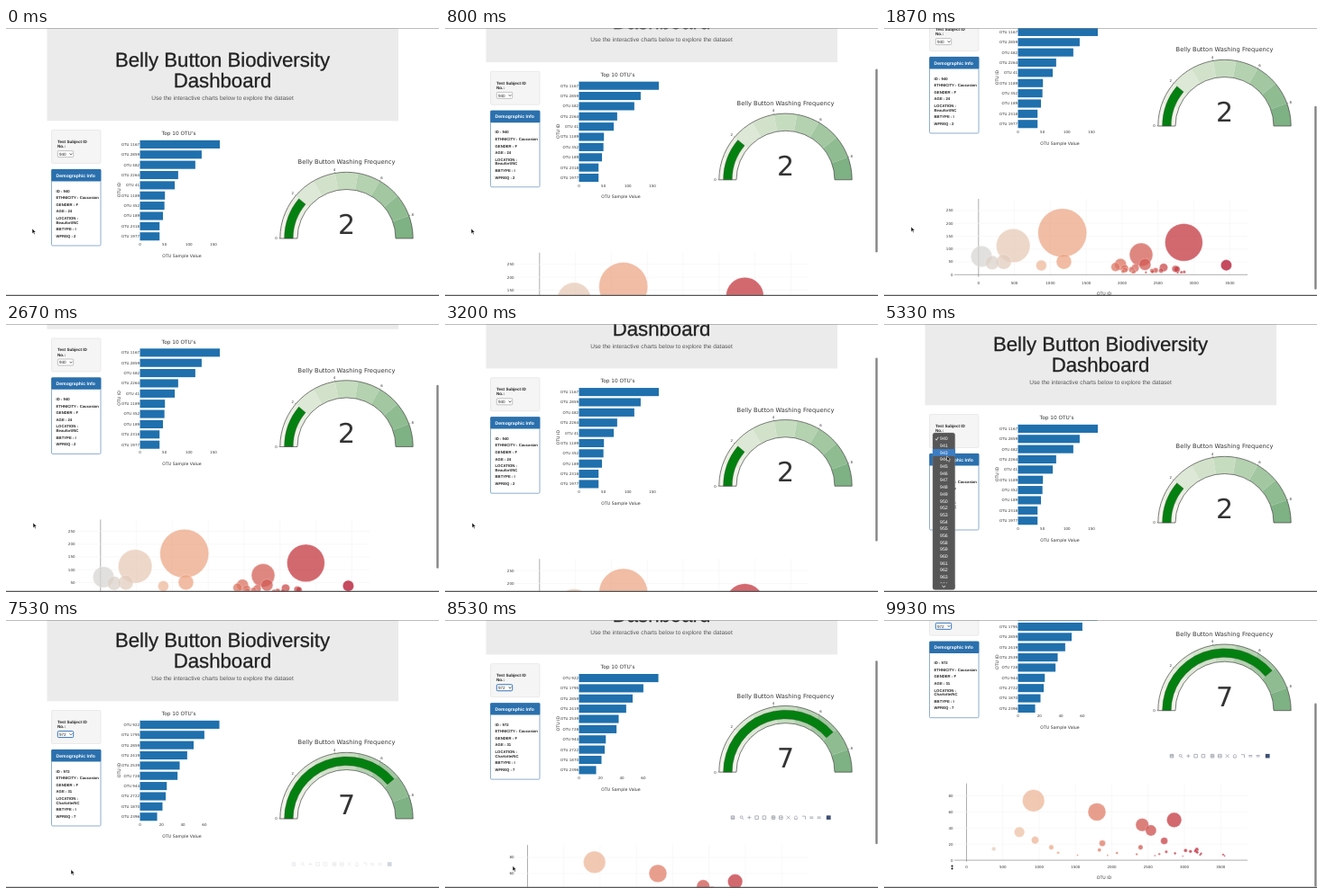
These frames come from a looping animation (480 px wide and 298 px high, 9990 ms). An HTML page:

```html
<!DOCTYPE html>
<html lang="en">
<head>
<meta charset="utf-8">
<title>Biodiversity Dashboard</title>
<style>
html, body { margin: 0; width: 100%; height: 100%; overflow: hidden; background: #fff; }
svg { display: block; width: 480px; height: 298px; }
text { font-family: "Liberation Sans", Arial, sans-serif; fill: #222; text-rendering: geometricPrecision; }
.plot text { font-family: "DejaVu Sans", Verdana, sans-serif; fill: #333; }
.mid { text-anchor: middle; }
.end { text-anchor: end; }
.bold { font-weight: bold; }
.grid { stroke: #f3f3f3; stroke-width: .6; }
.zero { stroke: #777; stroke-width: .6; }
#bar path { fill: none; stroke: #9da2ab; stroke-width: .8; }
#menu text { fill: #fff; }
</style>
</head>
<body>
<svg viewBox="0 0 480 298">
  <g id="page"></g>
  <rect id="thumb" x="477.2" width="2.4" height="204" rx="1.2" fill="#858585"/>
  <path d="M0 .3H480" stroke="#8a8a8a" stroke-width=".7"/>
  <path d="M0 297.4H480" stroke="#555" stroke-width="1.2"/>
  <g id="menu"></g>
  <g id="cursor">
    <path id="arrow" d="M0 0V5.6L1.4 4.4L2.3 6.4L3.3 6L2.4 4H4.1Z" fill="#111" stroke="#fff" stroke-width=".5"/>
    <path id="resize" d="M.5-1.5L2.2 .6H1V2.4H2.2L.5 4.5L-1.2 2.4H0V.6H-1.2Z" fill="#111" stroke="#fff" stroke-width=".4"/>
  </g>
</svg>
<script>
const LOOP = 9990, PICK = 6930;
const $ = id => document.getElementById(id);

// y is the vertical middle of the capitals
const text = (x, y, size, s, cls = '', more = '') =>
  `<text x="${x}" y="${y + size * .36}" font-size="${size}" class="${cls}" ${more}>${s}</text>`;
const rect = (x, y, w, h, fill, more = '') =>
  `<rect x="${x}" y="${y}" width="${w}" height="${h}" fill="${fill}" ${more}/>`;
const line = (x1, y1, x2, y2, cls) => `<path class="${cls}" d="M${x1} ${y1}L${x2} ${y2}"/>`;
const range = (n, f) => Array.from({ length: n }, (_, i) => f(i)).join('');

const ramp = (t, a, b) => Math.min(1, Math.max(0, (t - a) / (b - a)));
// A smooth move; a skew below 1 starts it faster
const ease = (t, a, b, skew = 1) => {
  const p = ramp(t, a, b) ** skew;
  return p * p * (3 - 2 * p);
};

// Linear interpolation between [position, ...values] points
function at(keys, t) {
  const i = keys.findIndex(k => k[0] > t);
  if (i < 0) return keys[keys.length - 1].slice(1);
  if (i === 0) return keys[0].slice(1);
  const a = keys[i - 1], b = keys[i], p = ramp(t, a[0], b[0]);
  return a.slice(1).map((v, j) => v + (b[j + 1] - v) * p);
}
const blend = (stops, v) => `rgb(${at(stops, v).map(Math.round)})`;

function random(seed) {
  return () => (seed = seed * 16807 % 2147483647) / 2147483647;
}

// The largest samples are given; the many small ones are scattered around them
const subjects = [
  {
    id: 940, age: 24, place: 'Beaufort/NC', wash: 2,
    barScale: .543, barStep: 50,
    x0: 104.8, xScale: .0796, y0: 399.3, yScale: .285, yStep: 50, yTicks: 6,
    otus: [1167, 2859, 482, 2264, 41, 1189, 352, 189, 2318, 1977, 3450, 874],
    values: [163, 126, 113, 78, 71, 51, 50, 47, 40, 40, 37, 36],
    small: { count: 20, from: 1900, to: 2950, top: 30, decay: .07 }
  },
  {
    id: 972, age: 31, place: 'Charlotte/NC', wash: 7,
    barScale: 1.19, barStep: 20,
    x0: 91.5, xScale: .0805, y0: 400.4, yScale: .895, yStep: 20, yTicks: 5,
    otus: [922, 1795, 2859, 2419, 2539, 728, 944, 2722, 1870, 2396, 1167],
    values: [74, 60, 50, 44, 37, 35, 25, 24, 21, 16, 16],
    small: { count: 21, from: 350, to: 3650, top: 14, decay: .05 }
  }
];

function samples(s) {
  const next = random(s.id), { count, from, to, top, decay } = s.small;
  const big = s.otus.map((otu, i) => [otu, s.values[i]]);
  const rest = Array.from({ length: count }, (_, i) =>
    [from + (to - from) * next(), top * Math.exp(-decay * i)]);
  return [...big, ...rest];
}

function header() {
  const outline = 'stroke="#222" stroke-width=".3"';
  return rect(45.5, -10, 389.5, 113.3, '#ebebeb') +
    text(240, 35.2, 22.2, 'Belly Button Biodiversity', 'mid', outline) +
    text(240, 58.4, 22.2, 'Dashboard', 'mid', outline) +
    text(240, 78, 6.56, 'Use the interactive charts below to explore the dataset', 'mid', 'style="fill:#555"');
}

function sidebar(s, focused) {
  const rows = [`ID : ${s.id}`, 'ETHNICITY : Caucasian', 'GENDER : F', `AGE : ${s.age}`,
    'LOCATION :', s.place, 'BBTYPE : I', `WFREQ : ${s.wash}`];
  const ring = focused ? 'stroke="#3474b8" stroke-width="1"' : 'stroke="#888" stroke-width=".5"';
  let y = 173.4;
  return rect(50.5, 113.5, 54.5, 37, '#f5f5f5', 'rx="1.3" stroke="#e0e0e0" stroke-width=".6"') +
    text(57, 126.2, 4.6, 'Test Subject ID', 'bold') + text(57, 131.6, 4.6, 'No.:', 'bold') +
    rect(57.3, 136.6, 17.4, 7, '#fff', `rx="1" ${ring}`) + text(59, 140.2, 4.6, s.id) +
    '<path d="M70.6 139.4L72 140.9L73.4 139.4" fill="none" stroke="#222" stroke-width=".7"/>' +
    rect(50.5, 157.3, 54.5, 84.7, '#fff', 'rx="1.3" stroke="#5f8cbc" stroke-width=".7"') +
    rect(50.3, 157, 55, 13.4, '#2b70ad', 'rx="1"') +
    text(55.6, 163.7, 5.1, 'Demographic Info', 'bold', 'style="fill:#fff"') +
    rows.map(row => text(55.5, y += row === s.place ? 4.6 : 7.6, 4.25, row, 'bold')).join('');
}

function barChart(s) {
  const x = v => 148.5 + v * s.barScale, y = i => 129.4 + i * 11.37;
  return range(4, i => text(x(i * s.barStep), 240.3, 4, i * s.barStep, 'mid')) +
    range(10, i => rect(148.5, y(i) - 4.55, s.values[i] * s.barScale, 9.1, '#1f70ad') +
      text(148, y(i), 4, 'OTU ' + s.otus[i], 'end')) +
    text(191.5, 117, 5.8, "Top 10 OTU's", 'mid') +
    text(195, 253, 4.7, 'OTU Sample Value', 'mid') +
    text(0, 0, 4.7, 'OTU ID', 'mid', 'transform="translate(125 180) rotate(-90)"');
}

function gauge(s) {
  const cx = 377.5, cy = 234;
  const pt = (v, r) => {
    const a = Math.PI * (1 - v / 9);
    return [cx + r * Math.cos(a), cy - r * Math.sin(a)];
  };
  const band = (a, b, r, R, style) =>
    `<path d="M${pt(a, R)}A${R} ${R} 0 0 1 ${pt(b, R)}L${pt(b, r)}A${r} ${r} 0 0 0 ${pt(a, r)}Z" ${style}/>`;
  const shades = [[0, 244, 244, 236], [4, 198, 220, 191], [8, 126, 177, 131]];
  return range(9, i => band(i, i + 1, 54.5, 73.7, `fill="${blend(shades, i)}"`)) +
    band(0, s.wash, 59.2, 69, 'fill="#048010" stroke="#444" stroke-width=".3"') +
    band(0, 9, 54.5, 73.7, 'fill="none" stroke="#444" stroke-width=".7"') +
    range(5, i => line(...pt(i * 2, 73.7), ...pt(i * 2, 75.2), 'zero') +
      text(...pt(i * 2, 78), 3.9, i * 2, 'mid')) +
    text(cx, 149, 6.68, 'Belly Button Washing Frequency', 'mid') +
    text(cx, 218.3, 30, s.wash, 'mid');
}

function bubbles(s) {
  const x = v => s.x0 + v * s.xScale, y = v => s.y0 - v * s.yScale;
  const reds = [[0, 215, 215, 215], [700, 238, 196, 168], [1400, 236, 153, 118], [3500, 178, 12, 40]];
  return range(8, i => line(x(i * 500), 315, x(i * 500), 402, i ? 'grid' : 'zero') +
      text(x(i * 500), 408.3, 4, i * 500, 'mid')) +
    range(s.yTicks, i => line(78, y(i * s.yStep), 403, y(i * s.yStep), i ? 'grid' : 'zero') +
      text(76.5, y(i * s.yStep), 4, i * s.yStep, 'end')) +
    samples(s).map(([otu, v]) => `<circle cx="${x(otu)}" cy="${y(v)}" r="${v * .166}"
      fill="${blend(reds, otu)}" opacity=".75" stroke="#fff" stroke-width=".35"/>`).join('') +
    text(244, 420, 4.7, 'OTU ID', 'mid');
}

// Groups of tool icons, each icon drawn around its own middle
function toolbar() {
  const box = 'M-1.8-1.8H1.8V1.8H-1.8Z', plus = 'M-2 0H2M0-2V2', bars = 'M-2-.7H2M-2 .7H2';
  const lens = 'M1-.4A1.4 1.4 0 1 0-1.8-.4A1.4 1.4 0 1 0 1-.4M.6 .7L2.2 2.2';
  const groups = [
    [319, box + bars], [329, lens, plus, box, box],
    [364, box + plus, box + 'M-2 0H2', 'M-2-2L2 2M2-2L-2 2', 'M-2 0L0-2L2 0M-1.3 0V2H1.3V0'],
    [398, 'M-2-1.5H1.5V2', bars, bars]
  ];
  return groups.map(([x, ...icons]) => icons.map((d, i) =>
    `<path transform="translate(${x + i * 8.3} 284.5)" d="${d}"/>`).join('')).join('') +
    rect(422.8, 282.2, 4.8, 4.6, '#3f4f75');
}

$('page').innerHTML = header() +
  subjects.map((s, i) => `<g id="view${i}">${sidebar(s, i)}<g class="plot">${barChart(s)}${gauge(s)}${bubbles(s)}</g></g>`).join('') +
  `<g id="bar">${toolbar()}</g>`;

const missing = [942, 951, 957, 965];
const choices = Array.from({ length: 36 }, (_, i) => 940 + i).filter(n => !missing.includes(n));
const ROW = 7.67, FIRST = 127.6;

function drawMenu(grow, pointerY) {
  const top = 121 - grow;
  const hot = Math.round((pointerY - FIRST + grow) / ROW);
  const items = choices.map((n, i) => {
    const y = FIRST + i * ROW - grow;
    if (y > 291) return '';
    return (i === hot && y < 288 ? rect(54, y - 3.9, 25, 7.8, '#3b7dc4') : '') +
      (i ? '' : `<path d="M57 ${y}L58.2 ${y + 1.6}L60.2 ${y - 1.8}" fill="none" stroke="#fff" stroke-width=".8"/>`) +
      text(62, y, 5.2, n);
  }).join('');
  $('menu').innerHTML = rect(54, top, 24.7, 295.5 - top, '#565657', 'rx="2.5" stroke="#888" stroke-width=".4"') +
    items + rect(54.3, 288.2, 24.1, 6.6, '#565657', 'rx="2"') +
    '<path d="M64.5 291L66.3 292.7L68.1 291" fill="none" stroke="#fff" stroke-width=".9"/>';
}

const pointerKeys = [[1070, 29, 223], [1670, 30, 221], [4330, 30, 221], [4930, 65, 127], [5070, 65, 127],
  [5330, 69.5, 146.5], [5850, 70, 289], [6330, 70, 289], [6700, 70, 284], [7330, 72, 277.5],
  [7530, 72, 277.5], [7800, 75, 273.5]];

function frame() {
  const t = performance.now() % LOOP;
  const scroll = 125 * ease(t, 130, 1670, .8) - 112 * ease(t, 2270, 4200, .72) +
    113 * ease(t, 8130, 9070, .88) + 7.3 * ease(t, 9470, 9930);
  const thumb = ramp(t, 130, 200) - ramp(t, 1870, 2130) + ramp(t, 2270, 2330) -
    ramp(t, 4330, 4600) + ramp(t, 8130, 8200);
  const [px, py] = at(pointerKeys, t);
  const show = (id, on) => $(id).setAttribute('opacity', +on);
  $('page').setAttribute('transform', `translate(0 ${-scroll})`);
  $('thumb').setAttribute('y', scroll * .69 + .5);
  $('cursor').setAttribute('transform', `translate(${px} ${py})`);
  show('thumb', thumb);
  show('view0', t < PICK);
  show('view1', t >= PICK);
  show('bar', ramp(t, 7450, 7800));
  show('arrow', t < 8700);
  show('resize', t >= 8700);
  const open = t >= 5070 && t < 7000;
  show('menu', open && 1 - ramp(t, 6870, 7000));
  if (open) drawMenu(59 * ramp(t, 5700, 6360), py);
  requestAnimationFrame(frame);
}
frame();
</script>
</body>
</html>
```
